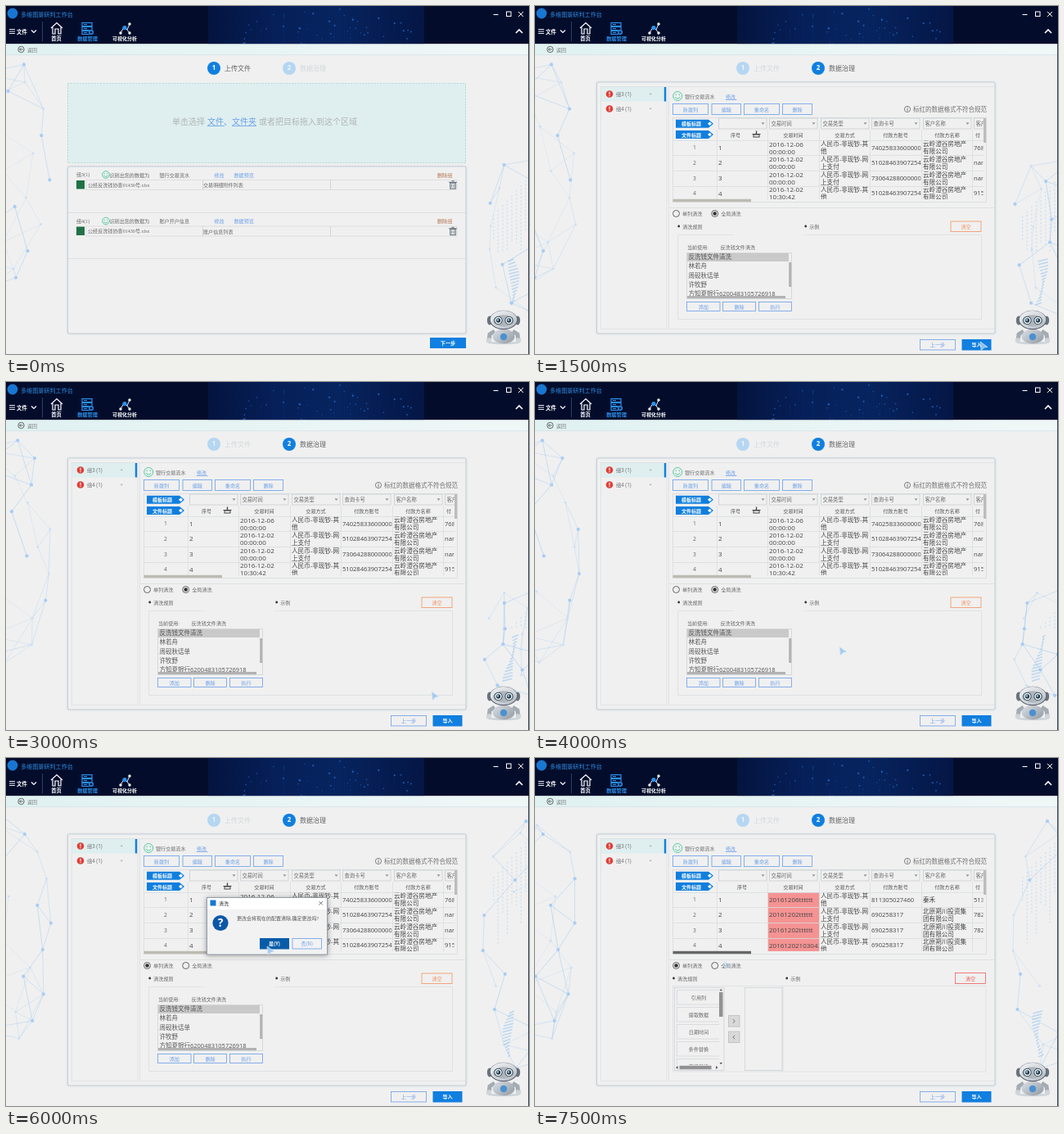
These frames come from a looping animation (639x425 px, 8 s). An HTML page with a canvas:

```html
<!DOCTYPE html>
<html lang="zh-CN">
<head>
<meta charset="utf-8">
<style>
html, body { margin: 0; width: 100%; height: 100%; overflow: hidden; background: #f0f0f0; }
canvas { display: block; width: 639px; height: 425px; }
</style>
</head>
<body>
<canvas id="c" width="639" height="425"></canvas>
<script>
const g = document.getElementById('c').getContext('2d');
const LOOP = 8000, STEP = 500;
const SANS = '"Noto Sans CJK SC","Noto Sans CJK",sans-serif';
const SERIF = '"Liberation Serif",' + SANS;
const LATIN = '"Open Sans",' + SANS;
const BLUE = '#107fdf', LINK = '#6a9fea', INK = '#686868', RULE = '#dcdfe2';

function rng(seed) {
  return () => (seed = (seed * 16807) % 2147483647) / 2147483647;
}
// Linear values between stops of [time, ...values]
function along(stops, t) {
  const i = stops.findIndex(s => s[0] > t);
  if (i < 1) return null;
  const [a, b] = [stops[i - 1], stops[i]], k = (t - a[0]) / (b[0] - a[0]);
  return a.slice(1).map((v, n) => v + (b[n + 1] - v) * k);
}
function text(s, x, y, size = 6.1, color = INK, align = 'left', font = SANS, weight = 400) {
  g.font = `${weight} ${size}px ${font}`;
  g.textAlign = align;
  g.textBaseline = 'middle';
  g.fillStyle = color;
  g.fillText(s, x, y + .4);
}
function mid(s, x, y, size, color, weight) { text(s, x, y, size, color, 'center', SANS, weight); }
function fill(x, y, w, h, color) { g.fillStyle = color; g.fillRect(x, y, w, h); }
function frame(x, y, w, h, color = RULE, lw = 1) {
  g.strokeStyle = color; g.lineWidth = lw; g.strokeRect(x, y, w, h);
}
function line(pts, color, lw = 1) {
  g.beginPath();
  for (let i = 0; i < pts.length; i += 2) g.lineTo(pts[i], pts[i + 1]);
  g.strokeStyle = color; g.lineWidth = lw; g.stroke();
}
function poly(pts, color) {
  g.beginPath();
  for (let i = 0; i < pts.length; i += 2) g.lineTo(pts[i], pts[i + 1]);
  g.closePath(); g.fillStyle = color; g.fill();
}
function oval(x, y, rx, ry, color) {
  g.beginPath(); g.ellipse(x, y, rx, ry, 0, 0, 7); g.fillStyle = color; g.fill();
}
function disc(x, y, r, color) { oval(x, y, r, r, color); }
function ring(x, y, r, color, lw = 1, a = 0, b = 7) {
  g.beginPath(); g.arc(x, y, r, a, b); g.strokeStyle = color; g.lineWidth = lw; g.stroke();
}
function clip(x, y, w, h, draw) {
  g.save(); g.beginPath(); g.rect(x, y, w, h); g.clip(); draw(); g.restore();
}
function button(s, x, y, w, h, solid, color = LINK) {
  if (solid) fill(x, y, w, h, solid);
  else frame(x + .5, y + .5, w - 1, h - 1, color, .8);
  mid(s, x + w / 2, y + h / 2, 6.1, solid ? '#fff' : color, solid ? 700 : 400);
}

// Rotating wire shapes at both edges
function makeNet(seed, cx, count) {
  const r = rng(seed), pts = [];
  for (let i = 0; i < count; i++)
    pts.push({ v: (2 * i + 1) / count - 1, a: i * 2.4 + r() });
  return { cx, pts };
}
const leftNet = makeNet(71, -1, 26), rightNet = makeNet(337, 638, 22);
const RIGHT_TOP = [[0, 180], [2000, 182], [3000, 248], [5000, 248], [6000, 70], [8000, 70]];

function drawNet({ cx, pts }, t, top, bottom) {
  const half = (bottom - top) / 2, reach = 42 + half * .17;
  const p = pts.map(({ v, a }) => {
    const rad = 56 * Math.sqrt(1 - v * v * .9), turn = a + t * .28;
    return { x: cx + rad * Math.cos(turn), y: top + half * (1 + v), z: rad * Math.sin(turn) };
  });
  p.forEach((a, i) => {
    p.slice(i + 1).forEach(b => {
      if (Math.hypot(a.x - b.x, a.y - b.y, a.z - b.z) > reach) return;
      line([a.x, a.y, b.x, b.y], `rgba(150,196,240,${.42 + (a.z + b.z) / 500})`, .8);
    });
    disc(a.x, a.y, a.z > 0 ? 2.1 : 1.4, a.z > 0 ? '#a9cdf3' : '#cadff5');
  });
}
function edges(t) {
  const [top] = along(RIGHT_TOP, t), s = t / 1000, r = rng(911);
  drawNet(leftNet, s, 66, 348);
  drawNet(rightNet, s, top, 386);
  // Twisting ladder of short bars
  for (let i = 0; i < 15; i++) {
    const w = 7 + 5 * Math.sin(i * .35 + s), x = 617 + 5 * Math.sin(i * .2 + s * .5);
    line([x - w / 2, 312 + i * 3.8, x + w / 2, 309 + i * 3.8], 'rgba(150,196,240,.6)', 1.5);
  }
  // Dotted columns hanging in the upper part
  for (let i = 0; i < 8; i++) {
    const x = 595 + i * 5.6, span = 30 + r() * 70, y0 = top + 75 - i * 6;
    for (let y = 0; y < span && y0 + y < 300; y += 4.5)
      fill(x, y0 + y, 1.3, 2.2, 'rgba(160,200,240,.4)');
  }
}

function header() {
  fill(0, 0, 639, 46.4, '#030d2b');
  const s = g.createLinearGradient(247, 0, 511, 0);
  [[0, '#04143f'], [.3, '#061f58'], [.6, '#07245f'], [1, '#041645']].forEach(([p, c]) => s.addColorStop(p, c));
  fill(247, 0, 264, 46.4, s);
  const r = rng(4242);
  for (let i = 0; i < 46; i++) {
    const x = 290 + r() * 205, lift = Math.sqrt(Math.max(0, 1 - ((x - 392) / 112) ** 2));
    const y = 46 - r() * 44 * lift;
    line([x, y, x, 46], 'rgba(40,105,200,.1)', .6);
    disc(x, y, .6 + r() * .6, `rgba(45,130,235,${.25 + r() * .45})`);
  }

  disc(8, 9, 6.4, '#1877d2');
  text('多维图景研判工作台', 18, 10, 7.1, '#2f8ce0');
  [28.5, 31, 33.5].forEach(y => line([4, y, 11, y], '#fff', .9));
  text('文件', 13, 31, 6.4, '#fff', 'left', SANS, 700);
  line([31, 29.5, 34, 32.5, 37, 29.5], '#fff', 1.2);
  line([44.5, 19, 44.5, 43], '#3c4b70', .8);

  line([55, 27, 62, 20.5, 69, 27], '#fff', 1.2);
  line([57, 26, 57, 34, 60, 34, 60, 28, 64, 28, 64, 34, 67, 34, 67, 26], '#fff', 1.2);
  mid('首页', 61.5, 39.5, 6.3, '#fff', 700);
  [20.5, 25.5, 30.5].forEach(y => {
    frame(93, y, 12, 4, '#2b91ee', 1.2);
    line([95, y + 2, 99, y + 2], '#2b91ee');
  });
  disc(104, 32, 3.2, '#04163c');
  ring(104, 32, 2.3, '#2b91ee', 1.4);
  mid('数据管理', 99.5, 39.5, 6.2, '#2b91ee', 700);
  line([140, 33, 144, 26, 148, 29, 151, 22], '#d8ecff', 1);
  line([148, 29, 151, 33], '#d8ecff', 1);
  [[140, 33], [151, 22], [151, 33]].forEach(([x, y]) => disc(x, y, 1.7, '#fff'));
  disc(145, 26.5, 2.6, '#2b91ee');
  mid('可视化分析', 145, 39.5, 6, '#fff', 700);

  line([595.5, 10.5, 601.5, 10.5], '#fff', 1.1);
  frame(611.5, 7, 5.5, 5.5, '#fff', 1);
  line([626, 7, 632, 13], '#fff'); line([632, 7, 626, 13], '#fff');
  line([623, 33, 627, 29, 631, 33], '#fff', 1.6);

  const b = g.createLinearGradient(0, 0, 639, 0);
  b.addColorStop(0, '#e0f1f1'); b.addColorStop(1, '#f0f7f7');
  fill(0, 46.4, 639, 13.2, b);
  fill(0, 59.4, 639, .7, '#cfe2e6');
  ring(18.5, 53, 3.7, '#444', .8);
  line([20.7, 53, 16.7, 53], '#444', .8);
  line([18.2, 51.3, 16.5, 53, 18.2, 54.7], '#444', .8);
  text('返回', 26, 53, 6, '#777');
}

function steps(active) {
  [[254, '上传文件'], [346, '数据治理']].forEach(([x, s], i) => {
    const on = i === active;
    disc(x, 76, 8, on ? BLUE : '#b5d6f2');
    text(String(i + 1), x, 76, 8, on ? '#fff' : '#eef5fb', 'center', LATIN, 700);
    text(s, x + 13, 76, 8, on ? '#666' : '#d3d8dc');
  });
}
function panel(y) {
  g.save();
  g.shadowColor = '#c3ced8'; g.shadowBlur = 3;
  g.beginPath(); g.roundRect(75.5, y, 486.5, 400 - y, 2);
  g.fillStyle = '#f0f0f0'; g.fill();
  g.restore();
  g.strokeStyle = '#c8d1d8'; g.lineWidth = 1.2; g.stroke();
}
function smile(x, y, r) {
  ring(x, y, r, '#45c79a', .9);
  ring(x, y, r * .55, '#45c79a', .9, .3, 2.84);
  disc(x - r * .38, y - r * .3, r * .14, '#45c79a');
  disc(x + r * .38, y - r * .3, r * .14, '#45c79a');
}
function bin(x, y) {
  frame(x - 3.2, y - 2.4, 6.4, 7, '#596373', 1);
  line([x - 4.8, y - 3.2, x + 4.8, y - 3.2], '#596373', 1);
  line([x - 1.5, y - 4.7, x + 1.5, y - 4.7], '#596373', 1);
  [-1.3, 1.3].forEach(d => line([x + d, y - .8, x + d, y + 3], '#596373', .8));
}

function group(y, label, kind, file) {
  text(label, 86, y, 6.1, INK, 'left', SERIF);
  smile(122, y, 4.3);
  text('识别出您的数据为', 126.5, y);
  text(kind, 187.5, y);
  text('修改', 254.5, y, 6.1, LINK);
  text('数据预览', 278.5, y, 6.1, LINK);
  text('删除组', 527, y, 6.1, '#b0714f');
  frame(97.5, y + 6.5, 453.5, 12, '#dadada', .8);
  line([240.5, y + 6.5, 240.5, y + 18.5], '#cfcfcf', .8);
  line([396.5, y + 6.5, 396.5, y + 18.5], '#cfcfcf', .8);
  fill(86, y + 7, 10, 10.5, '#207245');
  text('公经反洗钱协查01430号.xlsx', 100, y + 12.5, 6.1, INK, 'left', SERIF);
  text(file, 241, y + 12.5);
  bin(546, y + 12.5);
}
function uploadPage(hover) {
  steps(0);
  fill(75, 94.5, 487, 97, '#dfefef');
  g.setLineDash([2, 1.6]);
  frame(75.5, 94.5, 486, 97, '#a9d6d2', .9);
  g.setLineDash([]);
  text('单击选择', 203, 141, 10, '#b0b4b4');
  text('文件、', 246, 141, 10, LINK);
  text('文件夹', 276, 141, 10, LINK);
  line([246, 146.5, 267, 146.5], LINK, .8);
  line([276, 146.5, 306, 146.5], LINK, .8);
  text('或者把目标拖入到这个区域', 309, 141, 10, '#b0b4b4');
  panel(196);
  group(206, '组3(1)', '银行交易流水', '交易明细附件列表');
  line([76, 252.5, 561, 252.5], RULE);
  group(262.5, '组4(1)', '账户开户信息', '账户信息列表');
  line([76, 308.5, 561, 308.5], RULE);
  button('下一步', 518, 405, 44, 13, hover ? '#075ca9' : BLUE);
}

const FIRM_A = ['云岭澄谷房地产', '有限公司'], FIRM_B = ['北原朔川投资集', '团有限公司'];
const CASH = ['人民币-非现钞-其', '他'], WEB = ['人民币-非现钞-网', '上支付'];
const RAW = [
  [['2016-12-06', '00:00:00'], CASH, ['740258336000000'], FIRM_A, ['768']],
  [['2016-12-02', '00:00:00'], WEB, ['51028463907254'], FIRM_A, ['nan']],
  [['2016-12-02', '00:00:00'], WEB, ['730642880000000'], FIRM_A, ['nan']],
  [['2016-12-02', '10:30:42'], CASH, ['51028463907254'], FIRM_A, ['915']]
];
const PARSED = [
  [['20161206tttttt'], CASH, ['811305027460'], ['秦禾'], ['513']],
  [['20161202tttttt'], WEB, ['690258317'], FIRM_B, ['782']],
  [['20161202tttttt'], WEB, ['690258317'], FIRM_B, ['782']],
  [['20161202103042'], CASH, ['690258317'], FIRM_B, ['']]
];
const COLS = [222.5, 284.5, 347.5, 409.5, 472.5, 534.5, 548.5];
const HEADS = ['序号', '交易时间', '交易方式', '付款方账号', '付款方名称', '付'];
const PICKS = ['', '交易时间', '交易类型', '查询卡号', '客户名称', '客户'];

function tag(s, y) {
  poly([172, y - 5, 212, y - 5, 218, y, 212, y + 5, 172, y + 5], BLUE);
  mid(s, 191, y, 6, '#fff', 700);
  poly([211, y, 213.5, y - 2.3, 216, y, 213.5, y + 2.3], '#fff');
}
function table(done) {
  frame(168.5, 136.5, 383, 103, '#d8dbde', .8);
  tag('模板标题', 143.7); tag('文件标题', 157);
  clip(168, 136, 380.5, 100, () => {
    PICKS.forEach((s, i) => {
      const x = COLS[i] + 2;
      frame(x, 137, 58.5, 13, '#c8cdd2', .8);
      text(s, x + 2, 143.6, 6.3);
      poly([x + 52, 142.3, x + 56, 142.3, x + 54, 145], '#999');
      mid(HEADS[i], i ? (i < 5 ? COLS[i] + 31 : 541) : 245 + done * 8, 157, 6.1, '#555');
    });
    if (!done) {
      frame(267, 157, 7, 3, '#444', 1);
      line([265.5, 156.5, 275.5, 156.5], '#444', 1.2);
      line([270.5, 156, 270.5, 152.5], '#444', 1.4);
    }
    if (done) fill(284.5, 164, 63, 72, '#f59393');
    [164, 182, 201, 220, 236].forEach(y => line([168, y + .5, 549, y + .5], '#dadde0', .8));
    COLS.slice(0, 6).forEach(x => line([x, 151, x, 236], '#dadde0', .8));
    (done ? PARSED : RAW).forEach((row, i) => {
      const y = 173.3 + i * 18.6;
      text(String(i + 1), 195, y, 6.8, INK, 'center', LATIN);
      text(String(i + 1), 224, y, 8, '#444', 'left', LATIN);
      row.forEach((cell, j) => {
        const x = COLS[j + 1];
        clip(x, 164.5 + i * 18.6, COLS[j + 2] - x - 1, 18.5, () =>
          cell.forEach((s, k) => text(s, x + 1.5, y + (cell.length > 1 ? k * 9 - 4.2 : 0),
            j ? 7.6 : 8, '#444', 'left', LATIN)));
      });
    });
  });
  fill(168.5, 235.8, 95.5, 3.4, done ? '#666' : '#bdbab2');
  fill(548, 137, 3.2, 30, '#bcbcbc');
}

function radio(x, s, on, hot) {
  ring(x, 253.5, 4, hot ? '#2b83dc' : '#555', .9);
  if (on) disc(x, 253.5, 2.3, '#333');
  text(s, x + 7.5, 253.5);
}
function caption(s, x) { disc(x, 269, 1.4, '#333'); text(s, x + 4.5, 269); }

const SAVED = ['反洗钱文件清洗', '林若舟', '周砚秋话单', '许牧野', '方知夏银行6200483105726918'];
function globalRules() {
  caption('清洗规则', 175.7); caption('示例', 330.7);
  button('清空', 507.5, 262.5, 38, 13.5, '', '#f2925e');
  line([242, 279.5, 174.5, 279.5, 174.5, 382.5, 545.5, 382.5, 545.5, 279.5, 329, 279.5], RULE, .9);
  text('当前使用:', 186, 294); text('反洗钱文件清洗', 226.5, 294);
  frame(185.5, 301.5, 128, 56, '#cfd3d6', .8);
  fill(186, 302, 124, 10, '#c9c9c9');
  clip(186, 302, 124, 52.5, () => SAVED.forEach((s, i) =>
    text(s, 187.5, 307 + i * 11.1, 7.5, '#555', 'left', LATIN)));
  fill(310.2, 313, 3, 30, '#b2b2b2');
  fill(186, 354, 120, 3, '#b2b2b2');
  button('添加', 185, 361, 41.5, 12);
  button('删除', 229, 361, 41, 12);
  button('执行', 273, 361, 41, 12);
}
function columnRules() {
  caption('清洗规则', 169.5); caption('示例', 307.7);
  button('清空', 513, 262, 38, 14, '', '#f05c5c');
  frame(168.5, 278.5, 133.5, 104.5, RULE, .8);
  frame(303, 278.5, 248, 104.5, RULE, .8);
  frame(170.5, 280.5, 60.5, 101, '#cfd3d6', .8);
  frame(256.5, 280.5, 45.5, 101, '#cfd3d6', .8);
  clip(171, 281, 54, 94, () => ['引用列', '提取数据', '日期时间', '条件替换', '字段替换'].forEach((s, i) => {
    const y = 283.5 + i * 21;
    frame(173.5, y, 55, 17.5, '#d4d8db', .8);
    mid(s, 200, y + 8.8, 6.1, INK);
  }));
  fill(225, 286, 4.5, 30, '#929292');
  poly([225.5, 284.3, 229, 284.3, 227.2, 282], '#555');
  poly([225.5, 372, 229, 372, 227.2, 374.3], '#555');
  fill(176.5, 375.8, 39, 4.4, '#929292');
  poly([174.5, 376, 174.5, 380, 172, 378], '#555');
  poly([221, 376, 221, 380, 223.5, 378], '#555');
  [[314.5, 1], [334, -1]].forEach(([y, d]) => {
    fill(236, y, 14, 14, '#d9d9d9'); frame(236.5, y, 13.5, 13.5, '#bfbfbf', .8);
    line([243 - d * 1.2, y + 4.7, 243 + d * 1.2, y + 7, 243 - d * 1.2, y + 9.3], '#666', .9);
  });
}
function dialog() {
  g.save();
  g.shadowColor = 'rgba(0,0,0,.4)'; g.shadowBlur = 6; g.shadowOffsetY = 1;
  fill(245, 170, 148, 70, '#f2f2f2');
  g.restore();
  fill(245, 170, 148, 15, '#fff');
  frame(245.5, 170.5, 147, 69.5, '#8b96a3', .9);
  fill(249.5, 173.5, 7, 7, '#1877d2');
  text('清洗', 260, 177.5, 6.1, '#333');
  line([382.5, 175, 387, 179.5], '#555', .8); line([387, 175, 382.5, 179.5], '#555', .8);
  disc(262, 201.5, 9.6, '#0b58a8');
  text('?', 262, 201.5, 14, '#fff', 'center', LATIN, 700);
  text('更改会将现在的配置清除,确定更改吗?', 282, 196.5, 6, '#555', 'left', SERIF);
  button('是(Y)', 310, 220, 36, 13.5, '#075ca9');
  button('否(N)', 349.5, 220, 36.5, 13.5);
}

function dataPage(t) {
  const done = t >= 6500, single = t >= 5500;
  steps(1);
  panel(93);
  frame(80.5, 98.5, 80.5, 296, RULE, .8);
  frame(163.5, 98.5, 398, 296, RULE, .8);
  fill(81, 99, 77, 17.5, '#dfefef');
  fill(157.8, 99, 2.4, 17.5, BLUE);
  ['组3 (1)', '组4 (1)'].forEach((s, i) => {
    const y = 107.5 + i * 18;
    disc(91, y, 4.3, '#e23c35');
    fill(90.4, y - 2.7, 1.2, 3.4, '#fff'); fill(90.4, y + 1.5, 1.2, 1.2, '#fff');
    text(s, 99, y, 6.2, INK, 'left', LATIN);
    poly([139.5, y - .8, 143, y - .8, 141.2, y + .9], '#aaa');
  });
  smile(174.2, 110, 5.5);
  text('银行交易流水', 183, 110);
  text('修改', 233, 110, 6.1, LINK);
  line([232.5, 114.5, 246.5, 114.5], LINK, .7);
  button('新建列', 168, 119, 44, 14);
  button('编辑', 215.5, 119, 36.5, 14);
  button('重命名', 255, 119, 44, 14);
  button('删除', 302, 119, 37, 14);
  ring(455, 126, 3.6, '#666', .8);
  fill(454.6, 125.2, .9, 3, '#666'); fill(454.6, 123.6, .9, .9, '#666');
  text('标红的数据格式不符合规范', 462, 126, 7.5, '#737373');
  table(done);
  line([164, 246.5, 561, 246.5], RULE, .9);
  radio(172.5, '单列清洗', single, t === 5000);
  radio(219.7, '全局清洗', !single);
  (done ? columnRules : globalRules)();
  button('上一步', 470, 407, 44, 13.5);
  button('导入', 521.5, 407, 36, 13.5, BLUE);
  if (single && !done) dialog();
}

function robot() {
  const metal = g.createLinearGradient(590, 370, 626, 414);
  metal.addColorStop(0, '#f4f5f7'); metal.addColorStop(.5, '#cdd2d8'); metal.addColorStop(1, '#858e98');
  oval(608, 411.5, 19, 1.8, '#d0d4d8');
  [-1, 1].forEach(d => {
    line([608 + d * 11, 397, 608 + d * 17, 401, 608 + d * 18, 408], '#a3abb4', 5);
    disc(608 + d * 18, 408.5, 3.2, '#cfd5da');
    oval(608 + d * 17, 384, 3.2, 5.5, '#69737e');
  });
  oval(608, 403.5, 13.5, 9, metal);
  oval(608, 383.5, 17, 11.8, '#5e6873');
  oval(608, 383, 16.2, 11, metal);
  oval(608, 384.5, 13, 7.2, '#aeb6bf');
  [-6.5, 6.5].forEach(d => {
    disc(608 + d, 384, 5, '#2a3542');
    ring(608 + d, 384, 3.4, '#eefaff', 1.5);
    disc(607.4 + d, 383.4, 1.2, '#8fd9fb');
  });
  disc(608, 404, 4.2, '#4a91d2');
}

// Pointer stops: time, x, y
const PATH = [[1000, 551, 419], [1500, 548, 415], [2000, 534, 401], [2500, 529, 392], [3000, 524, 383],
  [3500, 470, 362], [5000, 188, 261], [5500, 248, 250], [6000, 323, 235], [7500, 235, 253], [8000, 232, 253]];
function pointer(t) {
  const at = along(PATH, t);
  if (!at) return;
  g.save();
  g.translate(...at);
  g.globalAlpha = t >= 7500 ? .4 : .9;
  const arrow = [-4, -5, 5, 1.5, .8, 2, -2.8, 5.5];
  poly(arrow, '#9cc8f0');
  line([...arrow, -4, -5], '#d3e6f7', .8);
  g.restore();
}

function draw(now) {
  const t = Math.floor(now % LOOP / STEP) * STEP;
  fill(0, 0, 639, 425, '#f0f0f0');
  clip(0, 61, 639, 364, () => edges(t));
  header();
  if (t < 1500) uploadPage(t === 1000); else dataPage(t);
  robot();
  pointer(t);
  fill(638, 46, 1, 379, '#39465c');
}
let start;
function tick(now) {
  start ??= now;
  draw(now - start);
  requestAnimationFrame(tick);
}
requestAnimationFrame(tick);
</script>
</body>
</html>
```
